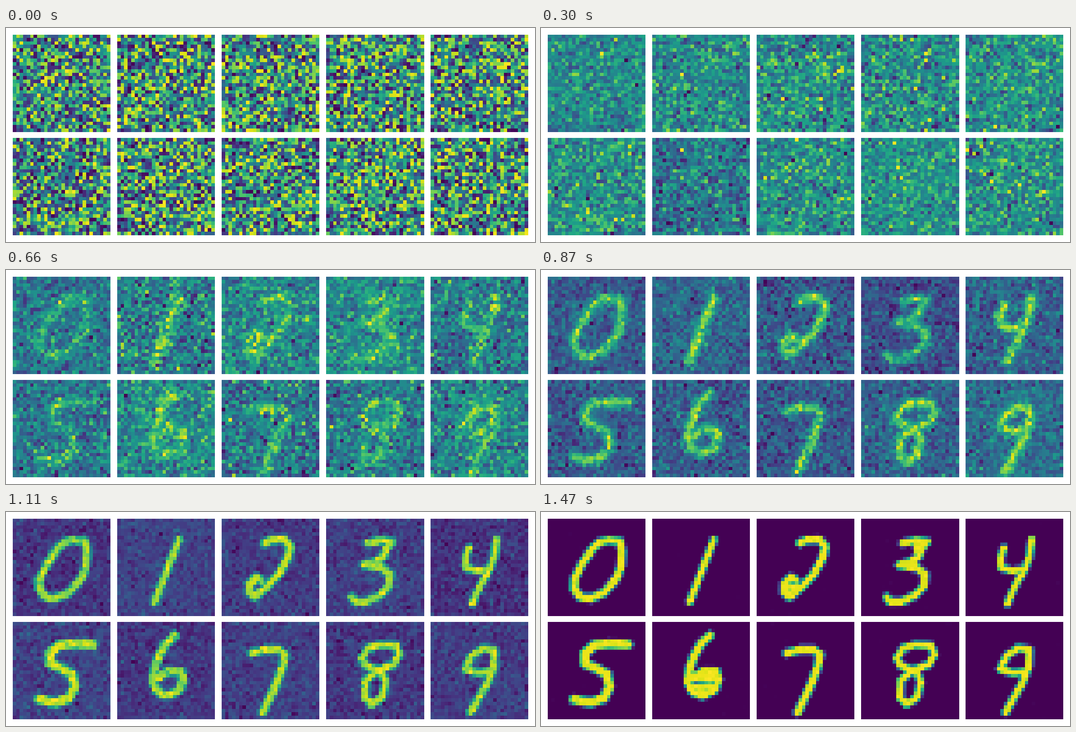
Recreate the animation shown at these times as a matplotlib script. Size 1175x477 px, loop 1500 ms.

```python
import numpy as np
import matplotlib.pyplot as plt
from matplotlib.animation import FuncAnimation

W, H, DPI = 1175, 477, 64  # a power of two keeps the pixel size exact
STEPS, INTERVAL = 50, 30
CELLS, SIDE = 28, 217

# Pen strokes per digit, in cell units; each digit is a list of polylines.
TOP = [
    [[(17.4, 6.3), (20.7, 6.6), (21.3, 9.7), (21, 13.8), (19.7, 17.2),
      (16.1, 21.3), (12.3, 23), (9.4, 22.6), (7.6, 20.3), (7.7, 17.4),
      (9.7, 13.3), (12.9, 8.6), (15.1, 6.8), (17.4, 6.3)]],
    [[(17.7, 6.1), (10.8, 23.9)]],
    [[(12.4, 7.1), (14.3, 6.2), (18, 6.1), (19.7, 8.1), (18.8, 11.6),
      (16.3, 16.1), (13, 19.6), (9.4, 22.5), (7.9, 21), (8, 18.7),
      (9.8, 16.9), (11.2, 17.7)]],
    [[(11.9, 7.1), (16, 6.3), (18.8, 6.7), (17, 9), (16.4, 11),
      (14.1, 12.4), (10.8, 13.4), (16, 14.2), (18.2, 16.1), (17.9, 19.4),
      (15.4, 22), (11.5, 23.9), (8.3, 23.9), (7.4, 22.6)]],
    [[(11, 8.6), (10.1, 11), (10.1, 14), (13.2, 15), (17, 14.6),
      (18.3, 11), (19, 6)],
     [(17, 14.6), (14.5, 18.7), (12, 24.4)]],
]
BOTTOM = [
    [[(23, 6.5), (18, 6.3), (13.5, 6.6), (10.6, 9), (10.7, 12),
      (14.2, 13.5), (17, 15.1), (17.7, 18.7), (16.1, 21.9), (12.3, 23.2),
      (7.6, 22.3)]],
    [[(16.6, 3.9), (13.9, 6.3), (12, 9.9), (10.7, 13.5), (10.2, 17.2),
      (11.7, 20.2), (14.5, 21.2), (18, 19.4), (18.9, 16.5), (18.3, 14.2),
      (14.6, 14.2), (12, 16)]],
    [[(8.7, 9), (12.4, 8), (16.3, 8), (18.2, 9.3), (17.5, 12.9),
      (15.6, 18), (11.8, 26)]],
    [[(15.4, 6.6), (19.9, 6.8), (21, 9.4), (19.2, 12.3), (14.7, 13.9),
      (11.2, 12.5), (10.2, 10.3), (12.1, 7.5), (15.4, 6.6)],
     [(14.7, 13.9), (11.3, 16.8), (11.1, 21.9), (13, 23.7), (16, 21.6),
      (17, 17.4), (16, 14.6)]],
    [[(18.3, 8), (15.1, 7.5), (11.9, 9.7), (9.9, 13.6), (13.8, 14.7),
      (17.4, 14.2)],
     [(18.3, 8), (18.1, 12.9), (16.4, 17.4), (13.8, 21.9), (11.5, 26)]],
]
DIGITS = TOP + BOTTOM
HALF = [1.2, 1.05, 1.2, 1.15, 1.05, 1.4, 1.25, 1.2, 1.1, 1.1]

# Hollows that close up towards the end.
FILLS = {
    2: [[(8.7, 19.5), (11, 19.8)]],
    3: [[(16, 7.5), (16.5, 10.5)], [(12, 13.2), (15, 13)]],
    6: [[(13, 16), (17, 16)], [(13, 18.8), (16.7, 18.5)]],
}

axis = np.arange(CELLS) + 0.5
GX, GY = np.meshgrid(axis, axis)


def distance(strokes):
    """Distance from each cell centre to the nearest stroke."""
    best = np.full(GX.shape, 99.0)
    for line in strokes:
        for (x0, y0), (x1, y1) in zip(line, line[1:]):
            dx, dy = x1 - x0, y1 - y0
            t = ((GX - x0) * dx + (GY - y0) * dy) / (dx * dx + dy * dy)
            t = np.clip(t, 0, 1)
            best = np.minimum(best, np.hypot(GX - x0 - t * dx, GY - y0 - t * dy))
    return best


def smooth(k, a, b):
    t = np.clip((k - a) / (b - a), 0, 1)
    return t * t * (3 - 2 * t)


def solid(dist, half):
    return np.clip(half + 0.5 - dist, 0, 1)


def ratio(k):
    """Signal strength relative to the noise."""
    keys = [0, 6, 15, 29, 37, 41, 45, 49]
    vals = [0.03, 0.12, 0.75, 5, 13, 17, 28, 60]
    return np.exp(np.interp(k, keys, np.log(vals)))


LINE_DIST = [distance(s) for s in DIGITS]
FILL_DIST = {n: distance(s) for n, s in FILLS.items()}


def shape(n, k):
    d = LINE_DIST[n]
    crisp = smooth(k, 26, 40)
    img = (1 - crisp) * np.exp(-(d / 1.5) ** 2) + crisp * solid(d, HALF[n])
    if n in FILL_DIST:
        img = np.maximum(img, smooth(k, 34, 48) * solid(FILL_DIST[n], 1.3))
    return img


def denoise():
    rng = np.random.default_rng(7)
    size = (len(DIGITS), CELLS, CELLS)
    noise = rng.uniform(-1.73, 1.73, size)
    keep = 0.88
    out = []
    for k in range(STEPS):
        if k:
            noise = keep * noise + np.sqrt(1 - keep**2) * rng.normal(size=size)
        floor = -5 + 7.2 * smooth(k, 42, 49)
        step = []
        for n in range(len(DIGITS)):
            img = ratio(k) * shape(n, k) + noise[n]
            img = np.maximum(img, floor)
            step.append((img - img.min()) / (img.max() - img.min()))
        out.append(step)
    return out


states = denoise()

fig = plt.figure(figsize=(W / DPI, H / DPI), dpi=DPI, facecolor="white")
panels = []
for n in range(len(DIGITS)):
    left, top = 15 + 232 * (n % 5), 15 + 230 * (n // 5)
    ax = fig.add_axes([left / W, 1 - (top + SIDE) / H, SIDE / W, SIDE / H])
    ax.axis("off")
    panels.append(ax.imshow(states[0][n], cmap="viridis", vmin=0, vmax=1,
                            interpolation="nearest", aspect="auto"))


def update(k):
    for panel, img in zip(panels, states[k]):
        panel.set_data(img)
    return panels


anim = FuncAnimation(fig, update, frames=STEPS, interval=INTERVAL,
                     repeat=True, repeat_delay=0, blit=False)
plt.show()
```
